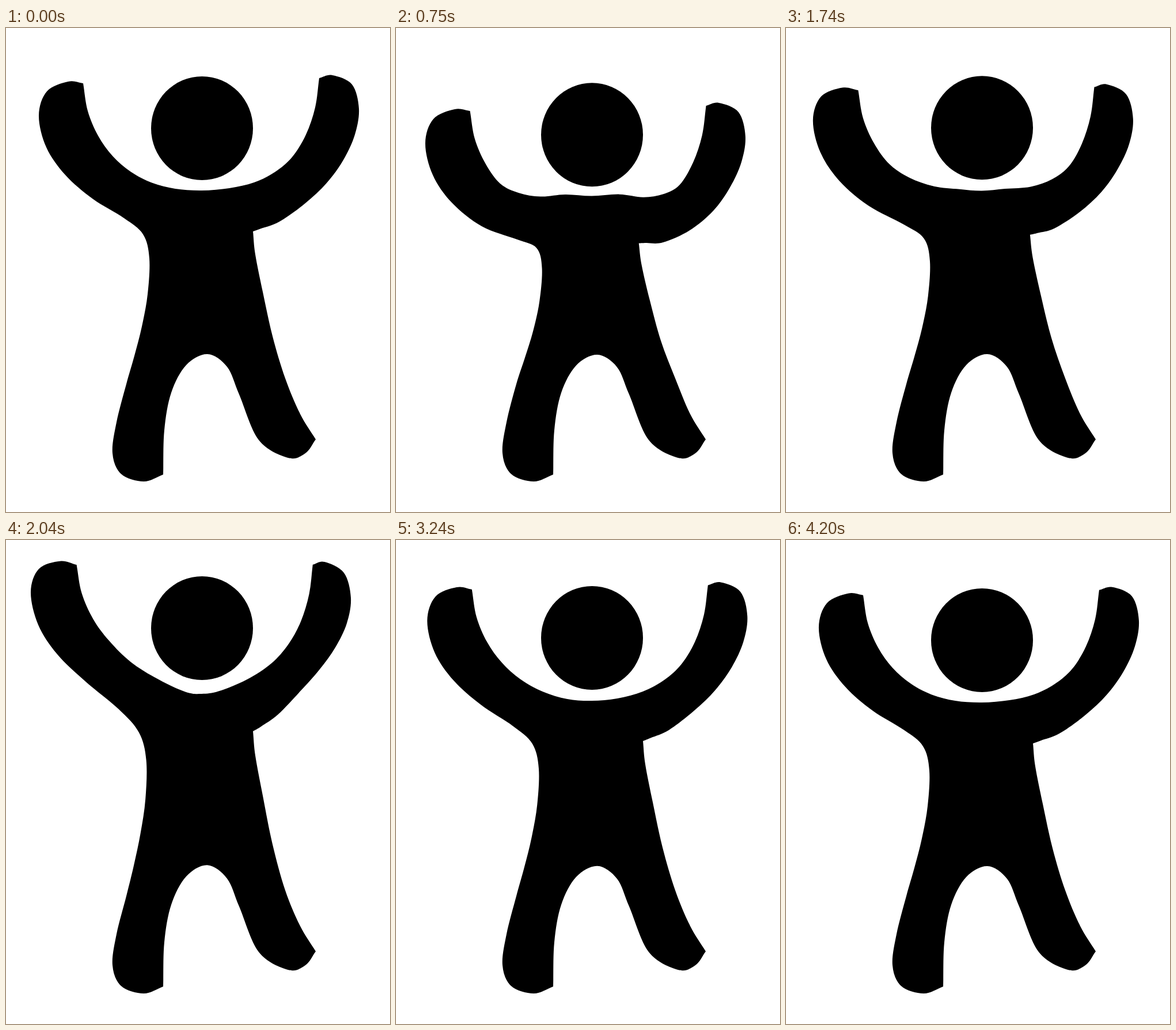
Animation, 667 px wide and 840 px high, one loop 4440 ms. Source, as an HTML page:

```html
<!DOCTYPE html>
<html lang="en">
<head>
<meta charset="utf-8">
<title>Jumping figure</title>
<style>
  html, body { margin: 0; width: 100%; height: 100%; overflow: hidden; background: #fff; }
  svg { display: block; width: 100%; height: 100%; }
</style>
</head>
<body>
<svg viewBox="0 0 667 840">
  <path id="body"/>
  <ellipse id="head" cx="340.5" rx="88.5" ry="90"/>
</svg>
<script>
const LOOP = 4440, STEP = 30, MIDDLE = 340;

// Key points of the standing outline; each run is one smooth edge between two sharp corners.
const outline = [
  "429,353 443,348 475,336 520,304 557,269 586,229 606,185 613,140 601,98 567,82 544,87",
  "544,87 537,138 521,185 497,224 467,250 431,268 388,278 340,282 294,279 252,268 216,249 185,222 160,187 142,144 134,96",
  "134,96 108,93 71,110 57,152 70,207 103,255 150,296 205,330 238,358 249,400 246,462 236,518 223,569 209,618 192,684 185,738 200,774 239,787 273,775",
  "273,775 275,698 287,633 313,585 350,566 384,588 405,636 439,715 490,746 520,738 538,714",
  "538,714 511,670 485,608 463,535 446,458 433,393 429,353"
].map(run => run.split(" ").map(p => p.split(",").map(Number)));

const ramp = (v, from, to) => Math.min(1, Math.max(0, (v - from) / (to - from)));

// Circular ease-out of the span that begins at start.
const ease = (t, start, length) =>
  Math.sqrt(1 - (1 - ramp(t, start, start + length)) ** 2);

// Bends a point of the standing figure: low sinks the shoulders, high throws the arms up.
function bend([x, y], low, high) {
  const side = x - MIDDLE, out = Math.abs(side);
  const arm = ramp(out, 45, 155);
  const hand = ramp(out, 100, 230);
  const free = ramp(y, 600, 300);               // feet stay planted
  const waist = ramp(y, 280, 350) * free;
  const chest = (1 - arm) ** 2 * (1 - ramp(y, 280, 350));

  const sinkX = -3 * arm * free - 4 * hand * free - 0.1 * side * waist;
  const sinkY = (11 + 44 * arm) * free;
  const riseX = -14 * hand * free - 0.4 * side * chest + (0.045 * side - 4) * waist;
  const riseY = (-15 - 27 * arm - 8 * hand + 11 * (side / 280) ** 3) * free;
  return [x + low * sinkX + high * riseX, y + low * sinkY + high * riseY];
}

// Smooth curve through the points, as path segments.
function spline(pts) {
  const mirror = (a, b) => [2 * a[0] - b[0], 2 * a[1] - b[1]];
  const n = pts.length;
  const all = [mirror(pts[0], pts[1]), ...pts, mirror(pts[n - 1], pts[n - 2])];
  const handle = (i, sign) =>
    [0, 1].map(k => all[i][k] + sign * (all[i + 1][k] - all[i - 1][k]) / 6);
  let d = "";
  for (let i = 1; i < n; i++) d += `C${handle(i, 1)} ${handle(i + 1, -1)} ${all[i + 1]}`;
  return d;
}

const body = document.getElementById("body");
const head = document.getElementById("head");

function draw(now) {
  const t = Math.floor(now % LOOP / STEP) * STEP;
  const jump = ease(t, 1710, 330);
  const low = 1.06 * ease(t, 0, 1740) * (1 - jump);
  const high = jump * (1 - ease(t, 2465, 1900));
  const runs = outline.map(run => run.map(p => bend(p, low, high)));

  head.setAttribute("cy", 174 + 13 * low - 21 * high);
  body.setAttribute("d", `M${runs[0][0]}${runs.map(spline).join("")}Z`);
  requestAnimationFrame(draw);
}
draw(performance.now());
</script>
</body>
</html>
```
